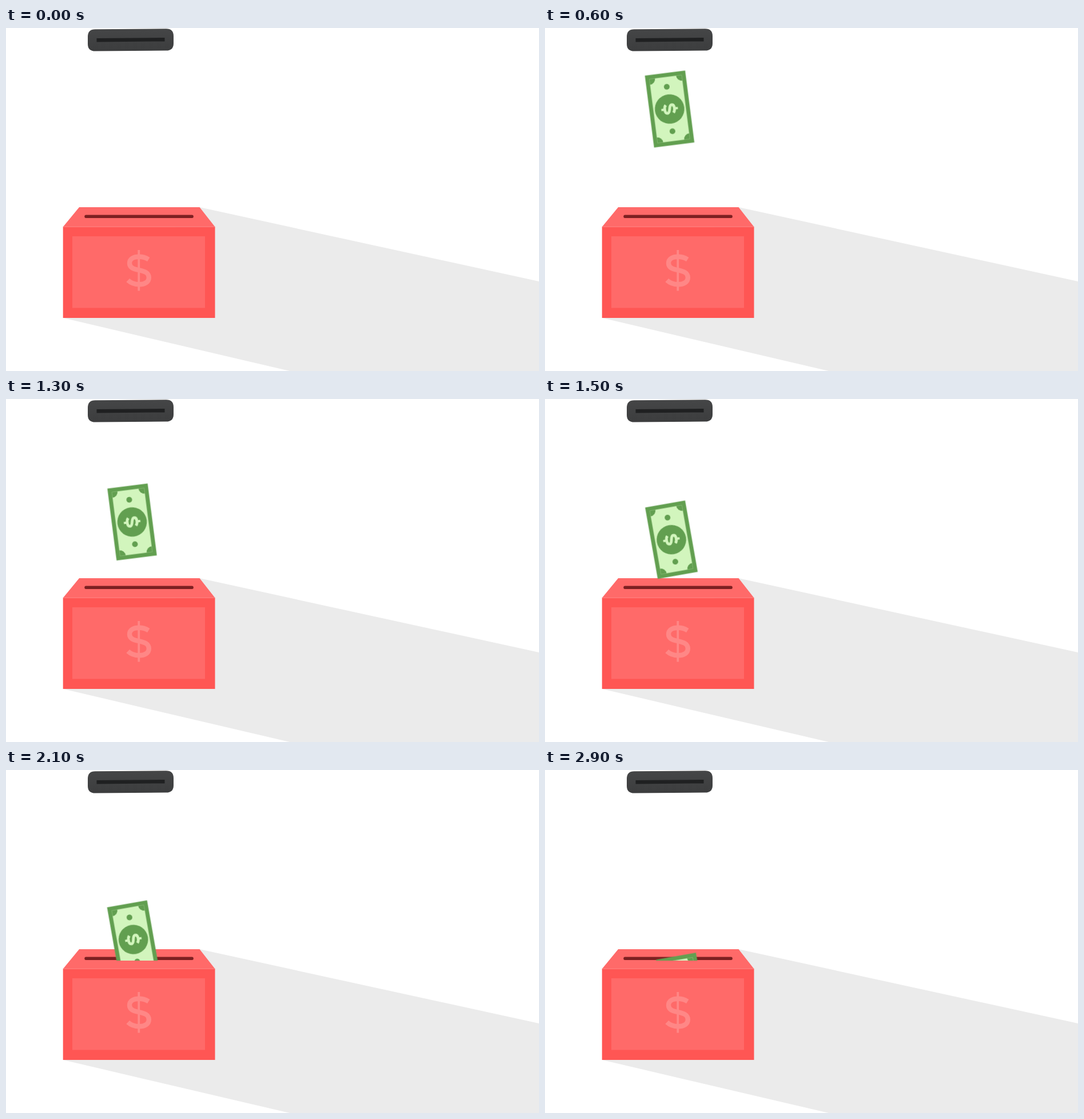
An HTML page that plays this animation: 932 by 601 pixels, repeating every 3 s.

```html
<!DOCTYPE html>
<html lang="en">
<head>
<meta charset="utf-8">
<title>Bill into box</title>
<style>
  html, body { margin: 0; width: 100%; height: 100%; overflow: hidden; background: #fff; }
  svg { display: block; width: 932px; height: 601px; }

  /* 3 s loop in 100 ms steps */
  #bill { animation: drop 3s infinite; }
  @keyframes drop {
    0%      { opacity: 0; transform: translate(216.7px, 98.6px) rotate(-10deg); animation-timing-function: step-end; }
    6.666%  { opacity: 1; transform: translate(216.7px, 98.6px) rotate(-10deg); animation-timing-function: steps(2); }
    13.333% { opacity: 1; transform: translate(217.5px, 120.3px) rotate(-7.3deg); animation-timing-function: steps(5); }
    29.999% { opacity: 1; transform: translate(218.5px, 174.5px) rotate(-7.3deg); animation-timing-function: steps(4); }
    43.333% { opacity: 1; transform: translate(220.5px, 215.5px) rotate(-7.3deg); animation-timing-function: step-end; }
    46.666% { opacity: 1; transform: translate(220.6px, 238px) rotate(-10deg); animation-timing-function: steps(3); }
    56.666% { opacity: 1; transform: translate(222px, 263.5px) rotate(-10deg); animation-timing-function: steps(4); }
    69.999% { opacity: 1; transform: translate(222.7px, 297px) rotate(-10deg); animation-timing-function: steps(4); }
    83.333% { opacity: 1; transform: translate(232.5px, 369.3px) rotate(-10deg); animation-timing-function: steps(4); }
    96.666%, 100% { opacity: 1; transform: translate(240px, 388.8px) rotate(-10deg); animation-timing-function: step-end; }
  }
</style>
</head>
<body>
<svg viewBox="0 0 932 601">
  <defs>
    <clipPath id="mouth"><rect width="932" height="334"/></clipPath>
    <clipPath id="inner"><rect x="-28.5" y="-56.5" width="57" height="113"/></clipPath>
    <linearGradient id="metal" x2="0" y2="1">
      <stop offset="0" stop-color="#454647"/>
      <stop offset="1" stop-color="#3c3d3e"/>
    </linearGradient>
  </defs>

  <path fill="#ebebeb" d="M338.5 314 932 444V601H496L100 508Z"/>

  <!-- dispenser -->
  <path fill="url(#metal)" d="M156 2.2 280 1.2Q293 1.2 293 14V27Q293 39.5 280 39.6L156 40.6Q143 40.6 143 28V15Q143 2.2 156 2.2Z"/>
  <path fill="#1f2021" d="M158.5 18 277.5 17V23.4L158.5 24.4Z"/>

  <!-- box -->
  <path fill="#ff6a69" d="M128 314H338.5L365.5 348.5H99.7Z"/>
  <path fill="#ff5654" d="M99.7 348.5H365.5V508H99.7Z"/>
  <path fill="#ff7c7b" d="M99.7 347.7H365.5V348.5H99.7Z"/>
  <rect x="116" y="365" width="232" height="125.5" fill="#ff6a69"/>
  <rect x="137.3" y="327.6" width="190.5" height="5.4" rx="2.5" fill="#7d2021"/>
  <g fill="none" stroke="#ff8786">
    <path stroke-width="8.4" d="M249.3 405.5C244 402.3 238.5 400.8 233 400.8C223 400.8 216 404.5 216 412C216 421 225 422.5 233 424.3C242 426.3 249.8 428.5 249.8 437.5C249.8 445.5 242 449.3 233 449.3C225.5 449.3 218 446.5 213.2 442"/>
    <path stroke-width="3.8" d="M232.3 389V460.5"/>
  </g>

  <g clip-path="url(#mouth)">
    <g id="bill">
      <rect x="-35.5" y="-63.5" width="71" height="127" fill="#629f50"/>
      <rect x="-28.5" y="-56.5" width="57" height="113" fill="#d2f5bd"/>
      <g fill="#629f50">
        <g clip-path="url(#inner)">
          <circle cx="-28.5" cy="-56.5" r="10"/>
          <circle cx="28.5" cy="-56.5" r="10"/>
          <circle cx="-28.5" cy="56.5" r="10"/>
          <circle cx="28.5" cy="56.5" r="10"/>
        </g>
        <circle r="25.8"/>
        <circle cy="-39.3" r="5"/>
        <circle cy="39.3" r="5"/>
      </g>
      <g transform="rotate(90)" fill="none" stroke="#d2f5bd">
        <path stroke-width="4.8" d="M7.3 -6C5 -8 2.5 -8.6 0 -8.6C-4 -8.6 -7 -7.2 -7 -4.4C-7 -1.2 -3 -.7 0 0C3 .7 7 1.2 7 4.4C7 7.2 4 8.6 0 8.6C-2.5 8.6 -5.5 8 -7.6 6"/>
        <path stroke-width="4" d="M0 -14.5V-9M0 9V14.5"/>
      </g>
    </g>
  </g>
</svg>
</body>
</html>
```
